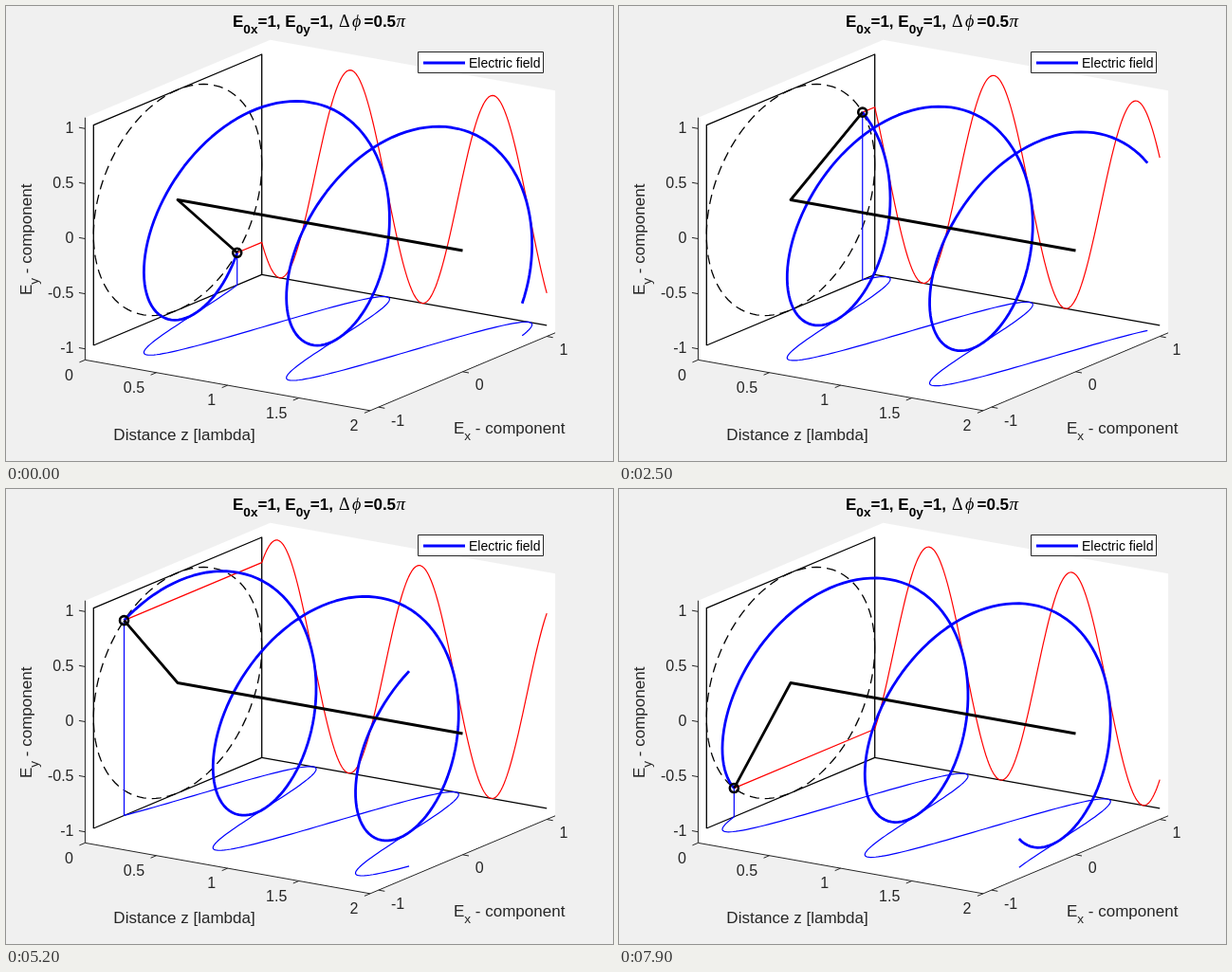
An HTML page with a canvas for the animation above (8000 ms loop, 640x480 px).

```html
<!DOCTYPE html>
<html lang="en">
<head>
<meta charset="utf-8">
<title>Circular polarisation</title>
<style>
  html, body { margin: 0; width: 100%; height: 100%; overflow: hidden; background: #f0f0f0; }
  canvas { display: block; }
</style>
</head>
<body>
<canvas id="stage" width="640" height="480"></canvas>
<script>
const ctx = document.getElementById('stage').getContext('2d');
const INK = '#262626', BLUE = '#00f', RED = '#f00', BLACK = '#000';
const SANS = '"Liberation Sans", Arial, sans-serif';
const SERIF = '"Liberation Serif", "DejaVu Serif", serif';
const LIMIT = 1.1, LENGTH = 2, LOOP = 8000, STEP = 100, HOLD = 4;
const TAU = 2 * Math.PI;

// Orthographic view: z runs to the right, x into the depth, y upwards.
const project = (z, x, y) => [
  181 + 150.25 * z + 88.7 * x,
  204.5 + 26.75 * z - 37.3 * x - 116.2 * y
];

function trace(points) {
  ctx.beginPath();
  points.forEach(([px, py]) => ctx.lineTo(px, py));
}

function stroke(points, color, width = 1.1) {
  trace(points);
  ctx.strokeStyle = color;
  ctx.lineWidth = width;
  ctx.stroke();
}

const sample = (count, fn) => Array.from({ length: count + 1 }, (_, i) => fn(i / count));

function text(str, x, y, size, align = 'left', style = '', family = SANS) {
  ctx.font = `${style} ${size}px ${family}`;
  ctx.textAlign = align;
  ctx.fillText(str, x, y);
  return x + ctx.measureText(str).width;
}

// Writes "E" with a subscript and the text that follows it.
function fieldLabel(sub, rest, x, y, style) {
  x = text('E', x, y, 17, 'left', style);
  x = text(sub, x, y + 7, 13.6, 'left', style);
  return text(rest, x, y, 17, 'left', style);
}

function tick([x, y], dx, dy) {
  stroke([[x, y], [x + dx, y + dy]], INK, 1);
}

function drawAxes() {
  const L = LIMIT;
  const leftTop = project(0, -L, L), leftBottom = project(0, -L, -L);
  const front = project(LENGTH, -L, -L), right = project(LENGTH, L, -L);
  trace([leftBottom, leftTop, project(0, L, L), project(LENGTH, L, L), right, front]);
  ctx.fillStyle = '#fff';
  ctx.fill();
  stroke([leftTop, leftBottom, front, right], INK, 1);

  ctx.fillStyle = INK;
  [1, 0.5, 0, -0.5, -1].forEach((v, i) => {
    tick(project(0, -L, v), -6.5, -1.2);
    text(v, 71.5, 133.5 + 58.1 * i, 16, 'right');
  });
  [0, 0.5, 1, 1.5, 2].forEach((v, i) => {
    tick(project(v, -L, -L), -6, 2.5);
    text(v, 71 + 75.1 * i, 394.5 + 13.4 * i, 16, 'right');
  });
  [-1, 0, 1].forEach((v, i) => {
    tick(project(LENGTH, v, -L), 6.5, 1.2);
    text(v, 406 + 88.7 * i, 442.5 - 37.3 * i, 16);
  });

  text('Distance z [lambda]', 188, 458, 17, 'center');
  fieldLabel('x', ' - component', 472, 451);
  ctx.save();
  ctx.translate(27, 305);
  ctx.rotate(-Math.PI / 2);
  fieldLabel('y', ' - component', 0, 0);
  ctx.restore();
}

function drawTitle() {
  ctx.fillStyle = BLACK;
  const x = fieldLabel('0x', '=1, ', 239, 21.5, 'bold');
  fieldLabel('0y', '=1, ', x, 21.5, 'bold');
  text('Δ', 351, 21.5, 18, 'left', '', SERIF);
  text('ϕ', 365, 21.5, 18, 'left', 'italic', SERIF);
  text('=0.5', 377.5, 21.5, 17, 'left', 'bold');
  text('π', 411.5, 21.5, 19, 'left', 'italic', SERIF);
}

function drawLegend() {
  ctx.fillStyle = '#fff';
  ctx.fillRect(434, 48, 133, 23);
  ctx.strokeStyle = INK;
  ctx.lineWidth = 1;
  ctx.strokeRect(434.5, 48.5, 132, 22);
  stroke([[440, 60], [484, 60]], BLUE, 2.8);
  ctx.fillStyle = BLACK;
  text('Electric field', 488, 65, 14);
}

function drawWall() {
  const corners = [[-1, -1], [-1, 1], [1, 1], [1, -1], [-1, -1]];
  stroke(corners.map(([x, y]) => project(0, x, y)), BLACK, 1.3);
  stroke([project(0, 1, -1), project(LENGTH, 1, -1)], BLACK, 1.3);
  ctx.setLineDash([10, 6]);
  stroke(sample(120, u => project(0, Math.cos(TAU * u), Math.sin(TAU * u))), BLACK, 1.3);
  ctx.setLineDash([]);
}

function drawWave(angle) {
  const wave = place => sample(200, u => {
    const z = LENGTH * u, a = angle - TAU * z;
    return place(z, Math.cos(a), Math.sin(a));
  });
  const x = Math.cos(angle), y = Math.sin(angle);
  const tip = project(0, x, y);

  stroke([tip, ...wave((z, x, y) => project(z, 1, y))], RED, 1.2);
  stroke([tip, ...wave((z, x) => project(z, x, -1))], BLUE, 1.2);
  stroke(wave(project), BLUE, 2.8);
  stroke([project(LENGTH, 0, 0), project(0, 0, 0), tip], BLACK, 2.8);

  ctx.beginPath();
  ctx.arc(...tip, 4.5, 0, TAU);
  ctx.lineWidth = 2.6;
  ctx.stroke();
}

function render(now) {
  const step = Math.max(0, Math.floor((now % LOOP) / STEP) - HOLD);
  ctx.fillStyle = '#f0f0f0';
  ctx.fillRect(0, 0, 640, 480);
  drawAxes();
  drawTitle();
  drawWall();
  drawWave(-TAU / 8 + step * TAU / 99);
  drawLegend();
}

ctx.lineJoin = 'round';
const start = performance.now();
(function loop() {
  render(performance.now() - start);
  requestAnimationFrame(loop);
})();
</script>
</body>
</html>
```
